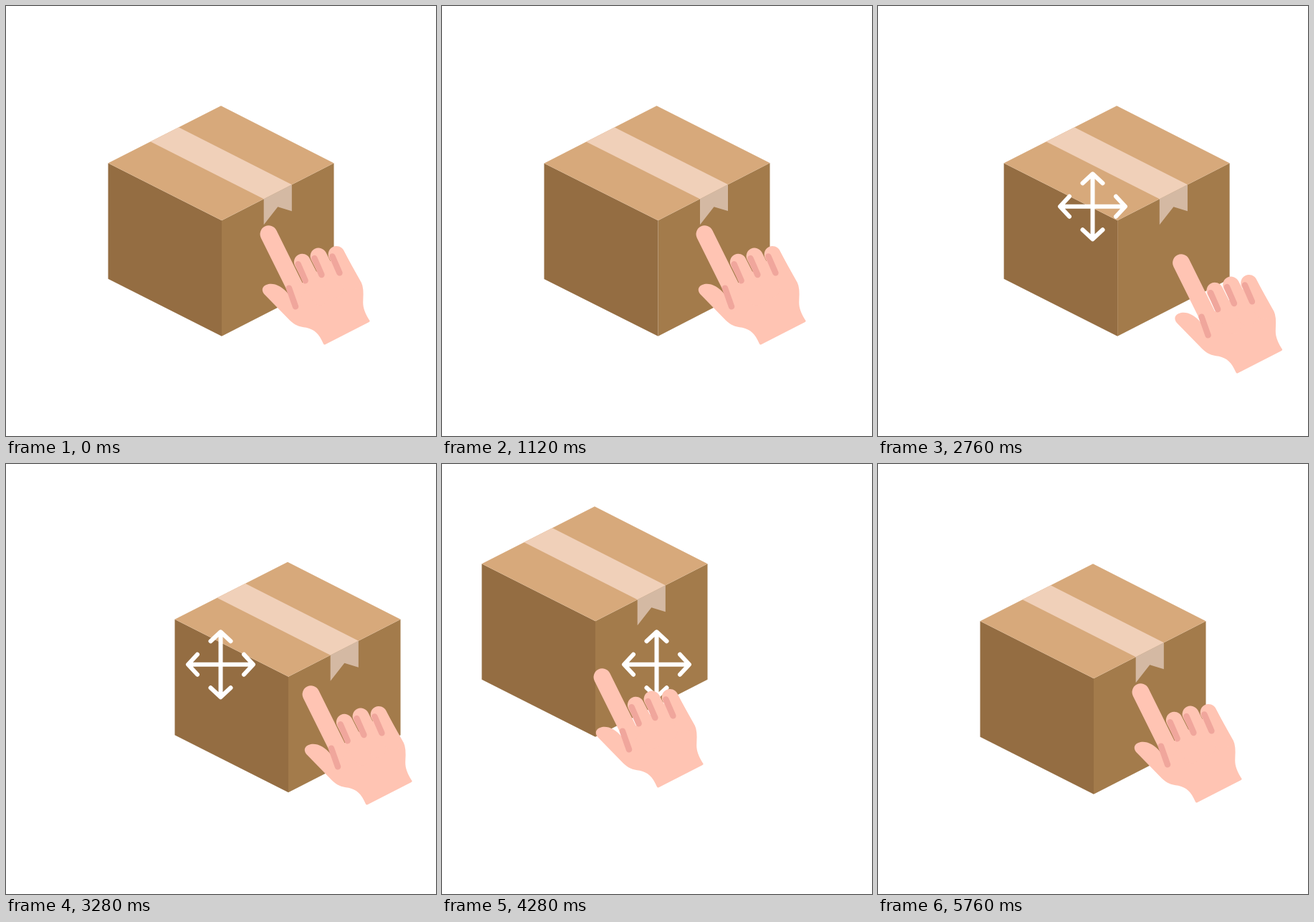
An HTML page with a canvas that plays this animation: 600x600 px, repeating every 6000 ms.

```html
<!DOCTYPE html>
<html lang="en">
<head>
<meta charset="utf-8">
<style>
html, body { margin: 0; height: 100%; overflow: hidden; background: #fff; }
canvas { display: block; width: 100vw; height: 100vh; }
</style>
</head>
<body>
<canvas id="stage" width="600" height="600"></canvas>
<script>
const ctx = document.getElementById("stage").getContext("2d");
const LOOP = 6000, STEP = 40;
const BOX_LAG = 120, BOX_TIME = 268; // the box settles after the hand stops
const SKIN = "#ffc4b3", FOLD = "#f0a69c";

// Where each gesture of the hand leads; parts not named stay where they are.
const gestures = [
  { start: 120, end: 400, hand: { x: 90 }, box: { turn: -3 } },
  { start: 760, end: 1040, hand: { x: 0 }, box: { turn: 0 } },
  { start: 1120, end: 1480, hand: { x: -239, y: -4, turn: 57 }, box: { turn: 3 } },
  { start: 1760, end: 2040, hand: { x: -28, y: 40, turn: 0 }, box: { turn: 0 } },
  { start: 2400, end: 2800, hand: { x: 59 }, box: { x: 93 } },
  { start: 3120, end: 3400, hand: { y: -21 }, box: { y: -80 } },
  { start: 3760, end: 4160, hand: { x: -143 }, box: { x: -87 } },
  { start: 4520, end: 4800, hand: { y: 41 }, box: { y: 0 } },
  { start: 5120, end: 5640, hand: { x: 0, y: 0 }, box: { x: 0 } },
];

function ease(t, start, end) {
  const p = Math.min(1, Math.max(0, (t - start) / (end - start)));
  return p * p * (3 - 2 * p);
}

function pose(part, t) {
  const now = { x: 0, y: 0, turn: 0 };
  for (const { start, end, [part]: goal } of gestures) {
    const stop = part === "box" ? end + BOX_LAG : end;
    const p = ease(t, part === "box" ? stop - BOX_TIME : start, stop);
    for (const key in goal) now[key] += (goal[key] - now[key]) * p;
  }
  return now;
}

const mix = (a, b, p) => a.map((v, i) => v + (b[i] - v) * p);
const down = ([x, y], dy) => [x, y + dy];

function fill(color, ...points) {
  ctx.beginPath();
  points.forEach(p => ctx.lineTo(...p));
  ctx.fillStyle = color;
  ctx.fill();
}

function stroke(color, width, path) {
  ctx.strokeStyle = color;
  ctx.lineWidth = width;
  ctx.stroke(new Path2D(path));
}

function drawBox({ x, y, turn }) {
  const height = 161.5, sink = Math.abs(turn) / 3;
  const [right, front, left, back] = [0, 1, 2, 3].map(i => {
    const a = (turn + i * 90) * Math.PI / 180;
    return [300 + x + 157.5 * Math.cos(a), 219.2 + y + sink + 80 * Math.sin(a)];
  });
  front[0] += 1;
  fill("#946d42", left, front, down(front, height), down(left, height));
  fill("#a37b4b", front, right, down(right, height), down(front, height));
  fill("#d7a97b", left, back, right, front);
  const a = mix(front, right, .375), b = mix(front, right, .625);
  fill("#f0d0b9", mix(left, back, .375), mix(left, back, .625), b, a);
  fill("#d4b9a3", a, b, down(b, 37), down(mix(a, b, .5), 21), down(a, 36));
}

function drawArrows(opacity) {
  ctx.save();
  ctx.globalAlpha = opacity;
  ctx.translate(299.5, 279.8);
  for (let i = 0; i < 4; i++) {
    stroke("#fff", 6, "M0 0V-45M-14 -32.500L0 -45.500L14 -32.500");
    ctx.rotate(Math.PI / 2);
  }
  ctx.restore();
}

const palm = new Path2D("M-48 26Q-50 17 -54 11C-63 -3 -81 -3 -78 11L-63 59" +
  "C-60 68 -56 73 -47 79C-38 87 -35 94 -36 110Q-36 112 -34 112H34Q37 112 36 109" +
  "C35 94 37 88 41 81Q50 66 50 58L48 7L-20 20Z");

function drawHand({ x, y, turn }) {
  ctx.save();
  ctx.translate(425 + x, 357 + y);
  ctx.rotate((turn - 27) * Math.PI / 180);
  ctx.fillStyle = SKIN;
  ctx.fill(palm);
  stroke(SKIN, 24, "M-34.500 -61L-35.500 26");
  stroke(FOLD, 8.5, "M-43.500 19L-47 46");
  for (const [fx, fy] of [[-10.5, -5], [13.5, -2], [37, 7]]) {
    stroke(SKIN, 23, `M${fx} ${fy}V50`);
    stroke(FOLD, 8.5, `M${fx - 6.5} ${fy}l-1.500 25`);
  }
  ctx.restore();
}

function frame(now) {
  const t = Math.floor(now % LOOP / STEP) * STEP;
  ctx.clearRect(0, 0, 600, 600);
  ctx.lineCap = ctx.lineJoin = "round";
  drawBox(pose("box", t));
  drawArrows(ease(t, 2040, 2400) - ease(t, 5120, 5400));
  drawHand(pose("hand", t));
  requestAnimationFrame(frame);
}
frame(performance.now());
</script>
</body>
</html>
```
